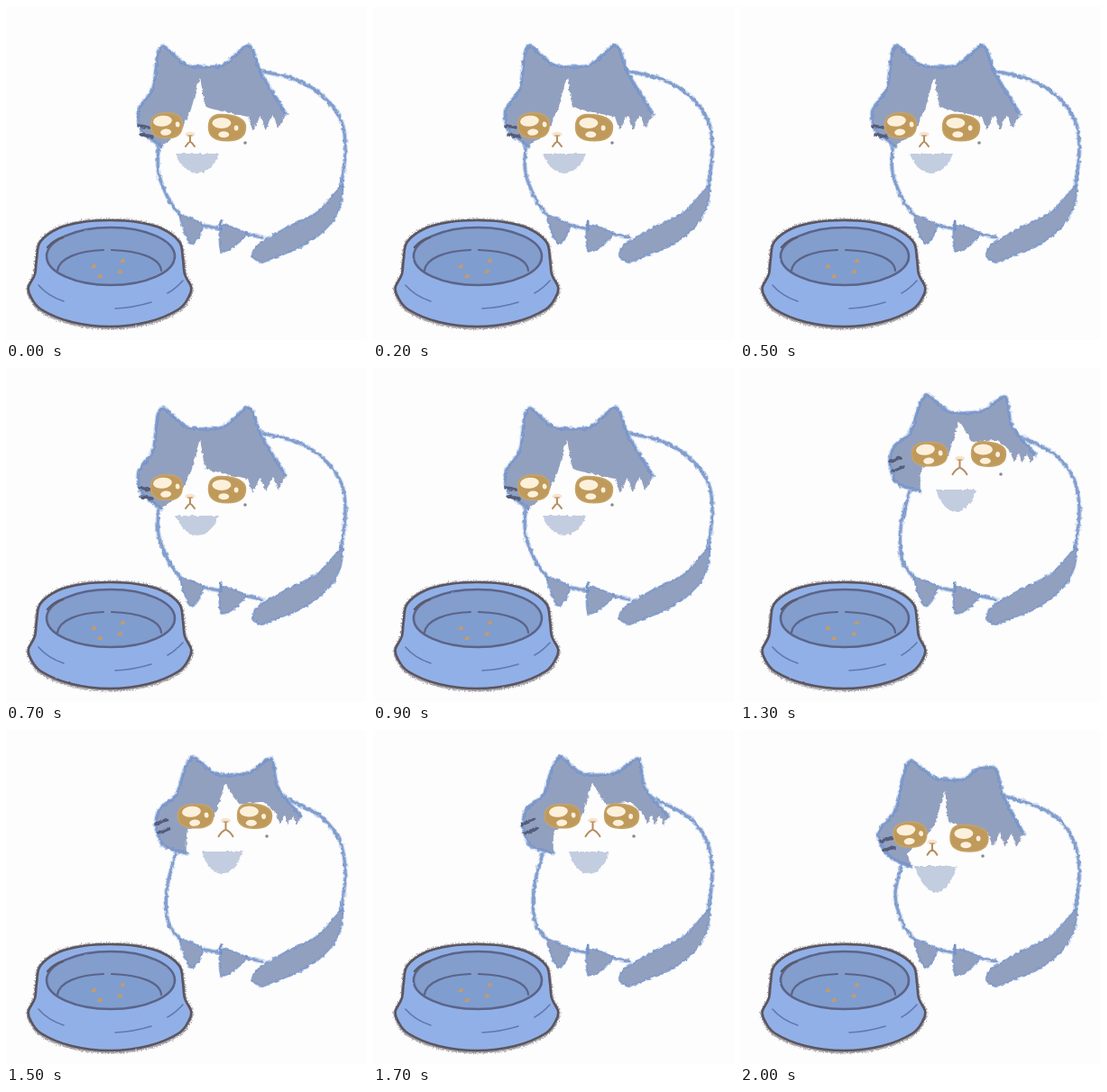
An HTML page for the animation above (2.1 s loop, 400 px wide and 371 px high).

```html
<!DOCTYPE html>
<html lang="en">
<head>
<meta charset="utf-8">
<title>Hungry cat</title>
<style>
  html, body { margin: 0; width: 100%; height: 100%; overflow: hidden; background: #fdfdfd; }
  svg { display: block; width: 100vw; height: 100vh; }
</style>
</head>
<body>
<svg id="stage" viewBox="0 0 400 371" fill="none" stroke-linecap="round" stroke-linejoin="round"></svg>
<script>
const FUR = '#92a0c0', LINE = '#7493c8', HALO = '#b4c5e6', INK = '#5b6488';
const stage = document.getElementById('stage');

function add(parent, tag, attrs = {}) {
  const el = document.createElementNS('http://www.w3.org/2000/svg', tag);
  for (const key in attrs) el.setAttribute(key, attrs[key]);
  return parent.appendChild(el);
}

// Rough edges: noise pushes the drawing about, then a slight blur.
function roughFilter(id, frequency, scale, blur) {
  const f = add(stage, 'filter', {
    id, filterUnits: 'userSpaceOnUse', x: 0, y: 0, width: 400, height: 371, 'color-interpolation-filters': 'sRGB'
  });
  const noise = add(f, 'feTurbulence', { type: 'fractalNoise', baseFrequency: frequency, numOctaves: 2 });
  add(f, 'feDisplacementMap', { in: 'SourceGraphic', scale, xChannelSelector: 'R', yChannelSelector: 'G' });
  add(f, 'feGaussianBlur', { stdDeviation: blur });
  return noise;
}

const points = text => text.split(' ').map(s => s.split(',').map(Number));
const lerp = (a, b, t) => a.map((v, i) => v + (b[i] - v) * t);
const range = (n, fn) => Array.from({ length: n }, (_, i) => fn(i));

// Smooth path through points; k sets the roundness.
function curve(p, k = 1, closed = false) {
  const n = p.length;
  const at = i => closed ? p[(i + n) % n] : p[Math.max(0, Math.min(n - 1, i))];
  let d = 'M' + p[0];
  for (let i = 0; i < (closed ? n : n - 1); i++) {
    const [a, b, c, e] = [at(i - 1), at(i), at(i + 1), at(i + 2)];
    const out = b.map((v, j) => v + (c[j] - a[j]) * k / 6);
    const into = c.map((v, j) => v - (e[j] - b[j]) * k / 6);
    d += `C${out} ${into} ${c}`;
  }
  return d + (closed ? 'Z' : '');
}

const group = filter => add(stage, 'g', filter ? { filter: `url(#${filter})` } : {});
const fill = (g, d, color) => add(g, 'path', { d, fill: color });
const line = (g, d, color, width, opacity = 1) =>
  add(g, 'path', { d, stroke: color, 'stroke-width': width, opacity });

function furLine(g, outline, area) {
  line(g, outline, HALO, 5.5, .6);
  if (area) fill(g, area, FUR);
  line(g, outline, LINE, 3.2, .85);
}

// Key points of the three head positions; eyes are [x, y, rx, ry].
const poses = {
  low: {
    head: '172,156 150,138 147,115 163,92 168,54 175,45 201,66 240,66 265,45 273,48 282,74 310,120',
    brow: '268,123 222,112 215,80 205,115 192,141 172,156', tooth: 15,
    eyes: ['178,132,17.3,14.6', '245,134.5,20.5,15.2'], nose: '204,143', mouth: 5, mole: '265,152',
    chest: '212,164,24,22', whisker: '153,134', lift: 2,
    back: '281,72 322,82 352,101', front: '169,156 169,185'
  },
  mid: {
    head: '190,152 165,140 153,115 173,88 181,50 190,34 215,53 248,55 262,44 283,43 292,74 314,115',
    brow: '275,114 232,102 227,68 216,104 203,122 186,136 190,152', tooth: 15,
    eyes: ['188.5,115.5,18.3,14.6', '254,119.5,21,15.4'], nose: '213,125', mouth: 5.5, mole: '269,140',
    chest: '217,151,23,29', whisker: '162,122', lift: -3,
    back: '292,73 332,86 356,102', front: '180,148 172,182'
  },
  high: {
    head: '200,137 174,128 166,105 171,87 189,72 198,44 208,30 232,49 268,48 294,32 301,64 327,96',
    brow: '300,94 285,80 258,82 243,60 230,98 201,112 200,137', tooth: 10,
    eyes: ['210,95,19.6,13.8', '275.5,95,19,14.2'], nose: '243.5,101', mouth: 8, mole: '289,118',
    chest: '239.5,135,22.5,25', whisker: '172,102', lift: -5,
    back: '313,77 346,94 362,110', front: '188,137 178,178'
  }
};

function fringe(a, b, teeth, length) {
  return range(teeth, i => {
    const [x, y] = lerp(a, b, (i + .6) / teeth);
    return [[x, y + length], lerp(a, b, (i + 1) / teeth)];
  }).flat();
}

// Rounded box with a top edge that droops outward.
function eye(g, text, side) {
  const [cx, cy, rx, ry] = text.split(',').map(Number);
  const soft = v => Math.sign(v) * Math.abs(v) ** .8;
  const rim = range(16, i => {
    const x = soft(Math.cos(i * Math.PI / 8)), y = soft(Math.sin(i * Math.PI / 8));
    return [cx + rx * x, cy + ry * y * (y < 0 ? .9 - .17 * side * x : 1)];
  });
  add(g, 'path', { d: curve(rim, 1, true), fill: '#bf9a5b', stroke: '#c6a367', 'stroke-width': 1.5 });
  const shine = add(g, 'g', { transform: `translate(${cx - 2 - 2 * side} ${cy}) rotate(${6 + 6 * side})`, fill: '#fdf0db' });
  for (const [x, y, r, s] of [[-3, -4, 10.5, 6], [2, 8, 6, 3.6], [14, -2, 2.4, 3]])
    add(shine, 'ellipse', { rx: r, ry: s, transform: `translate(${x} ${y}) rotate(-12)` });
}

function muzzle(g, pose) {
  const [[x, y]] = points(pose.nose), [[mx, my]] = points(pose.mole), m = pose.mouth;
  const fork = y + 4 + m * .7, end = y + 6 + m * 1.4;
  add(g, 'ellipse', { cx: x, cy: y - .5, rx: 5.5, ry: 2.8, fill: '#f7e4cd' });
  line(g, `M${x - 2} ${y + 1}h4`, '#d5b089', 2);
  line(g, `M${x} ${y + 2}V${fork}M${x - m} ${end}Q${x - m * .6} ${fork + 2} ${x} ${fork}Q${x + m * .6} ${fork + 2} ${x + m} ${end}`, '#b58c5d', 2);
  add(g, 'circle', { cx: mx, cy: my, r: 1.8, fill: '#8b8890' });
}

function drawPose(pose) {
  const all = add(stage, 'g');
  const coat = all.appendChild(group('crayon'));
  furLine(coat, curve([...points(pose.back), ...points('372,129 376,162 371,203')]));
  furLine(coat, curve([...points(pose.front), ...points('180,214 194,234')]));

  const head = points(pose.head), brow = points(pose.brow);
  const outline = curve(head, .7);
  const inner = curve([head.at(-1), ...fringe(head.at(-1), brow[0], 3, pose.tooth), ...brow], .35);
  furLine(coat, outline, outline + inner.replace('M', 'L') + 'Z');

  const [cx, top, w, h] = pose.chest.split(',').map(Number);
  fill(coat, `M${cx - w} ${top}H${cx + w}C${cx + w * .8} ${top + h * .6} ${cx + w * .4} ${top + h} ${cx} ${top + h}S${cx - w * .8} ${top + h * .6} ${cx - w} ${top}Z`, '#c3cde0');
  const [[wx, wy]] = points(pose.whisker);
  for (const i of [0, 1])
    line(coat, `M${wx - 6 + i * 3} ${wy - pose.lift / 2 + i * 10}l12 ${pose.lift}`, '#555c7a', 3.6);

  const face = all.appendChild(group('soft'));
  pose.eyes.forEach((e, i) => eye(face, e, i));
  muzzle(face, pose);
  return all;
}

function drawPaws() {
  const g = group('crayon');
  furLine(g, curve(points('216,243 240,248 284,257')));
  const tail = '372,200 371,220 362,239 345,256 322,270 298,279 283,285 273,278 278,266 311,246 345,229';
  for (const part of [tail, '193,233 218,243 211,261 203,263', '238,243 266,253 250,269 238,272']) {
    const d = curve(points(part), .6, true);
    fill(g, d, FUR);
    line(g, d, LINE, 2.2, .75);
  }
  line(g, 'M238 239v9', LINE, 3);
}

function drawBowl() {
  const cx = 115;
  const profile = points('0,238 30,240 57,247 77,262 81,281 83,298 90,312 88,322 76,337 42,351 0,356');
  const side = s => profile.map(([x, y]) => [cx + s * x, y]);
  const shape = curve([...side(1), ...side(-1).slice(1, -1).reverse()], 1, true);
  const well = { cx: cx + 1, cy: 278, rx: 71, ry: 32 };
  const shade = group('grain');
  line(shade, shape, '#8d8790', 4.5, .6);
  add(shade, 'path', { d: shape, stroke: '#8d8790', 'stroke-width': 4, opacity: .6, transform: 'translate(0 1.5)' });

  const g = group();
  fill(g, shape, '#91b0e7');
  add(g, 'ellipse', { ...well, fill: '#839dcd' });
  fill(g, `M57 294A57.5 22 0 0 1 172 294Q${cx} 326 57 294Z`, '#809dd0');

  const ink = group('soft');
  line(ink, shape, '#5b555f', 2.6);
  add(ink, 'ellipse', { ...well, stroke: INK, 'stroke-width': 2.6 });
  line(ink, 'M57 294C59 280 80 272 108 271M117 271C148 272 171 280 172 294', INK, 2.2);
  line(ink, 'M46 268Q53 260 63 257', '#5c5a68', 2.4);
  line(ink, 'M36 310Q46 322 64 328M121 336Q142 335 161 329M179 319Q188 314 196 305', '#6079ad', 1.6);
  for (const [x, y] of points('97,289 129,283 126,295 104,300'))
    fill(g, `M${x - 3} ${y + 2}l3 -4.5l3 1.5l-1 3Z`, '#c39c68');
}

const noises = [roughFilter('crayon', .22, 4, .5), roughFilter('grain', .6, 5, .4), roughFilter('soft', .15, 1.5, .35)];
const views = Object.fromEntries(Object.entries(poses).map(([name, pose]) => [name, drawPose(pose)]));
drawPaws();
drawBowl();

// The head rests low, passes through mid, stays high and passes back.
const STEP = 100, STEPS = 21, RISE = 11, FALL = 20;
const poseAt = n => n < RISE ? 'low' : n === RISE || n === FALL ? 'mid' : 'high';
let last = -1;

function tick() {
  const n = Math.floor(performance.now() / STEP) % STEPS;
  if (n !== last) {
    last = n;
    for (const name in views) views[name].setAttribute('display', name === poseAt(n) ? 'inline' : 'none');
    noises.forEach(f => f.setAttribute('seed', 3 + n % 3));
  }
  requestAnimationFrame(tick);
}
tick();
</script>
</body>
</html>
```
